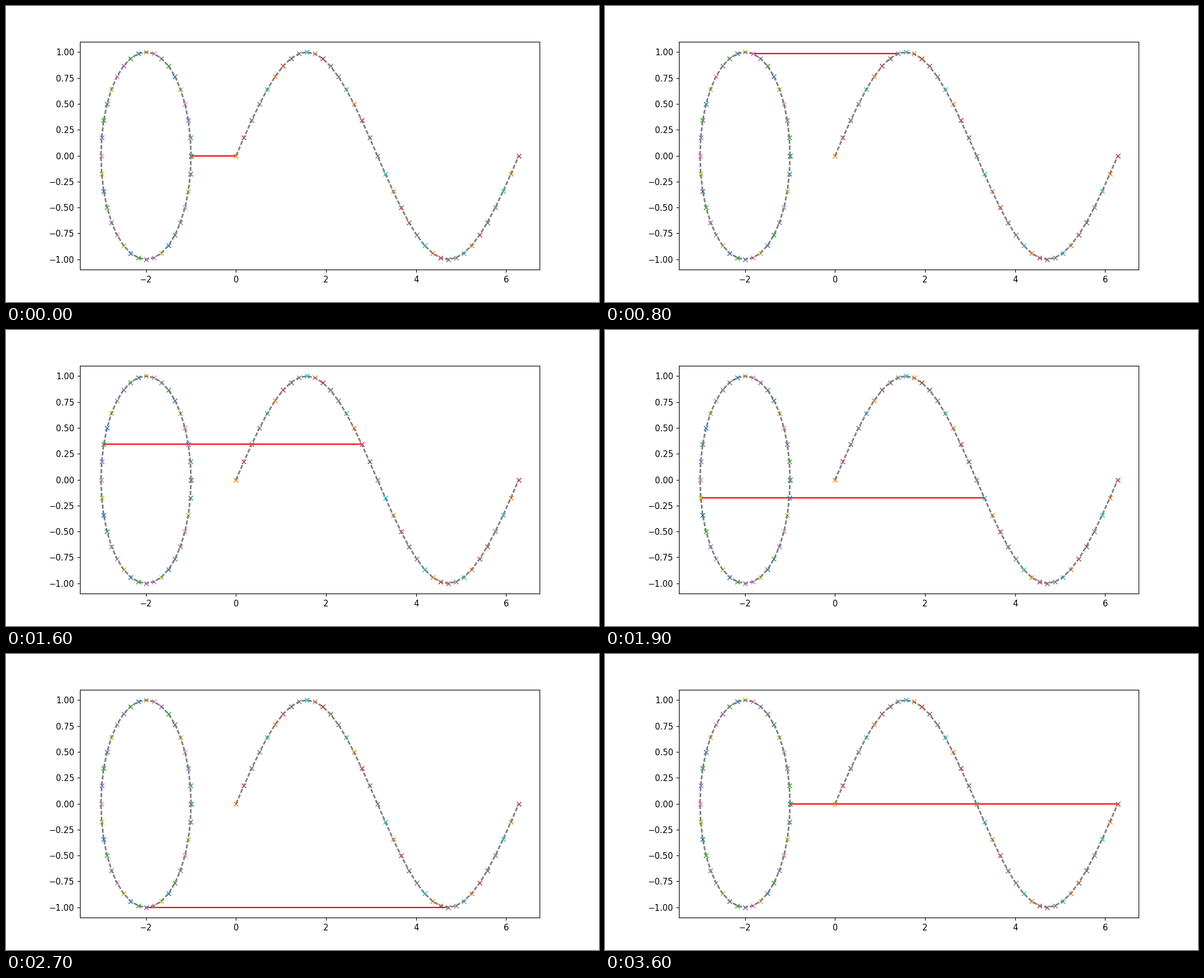
Write a matplotlib script that moves like this. It is 1058 px wide and 529 px high and loops after 3.7 s.

```python
import numpy as np
import matplotlib.pyplot as plt
from matplotlib.animation import FuncAnimation

STEPS = 37
INTERVAL = 100
DASHES = (0, (2.52, 1.09))

theta = np.linspace(0, 2 * np.pi, STEPS)
circle_x = np.cos(theta) - 2
height = np.sin(theta)

fig, ax = plt.subplots(figsize=(10, 5), dpi=105.8)
fig.subplots_adjust(bottom=0.1092, top=0.8792)

# Layers from back to front: connecting line, markers, dashed curves.
link, = ax.plot([circle_x[0], theta[0]], [0, 0], color="red", zorder=1.5)

# Circle and wave points share one colour cycle.
for i in range(STEPS):
    ax.plot(circle_x[i], height[i], "x", color=f"C{2 * i % 10}")
    ax.plot(theta[i], height[i], "x", color=f"C{(2 * i + 1) % 10}")

for x in (circle_x, theta):
    ax.plot(x, height, color="gray", linestyle=DASHES, linewidth=2)

ax.set_xlim(ax.get_xlim())
ax.set_ylim(-1.1, 1.1)


def update(i):
    link.set_data([circle_x[i], theta[i]], [height[i], height[i]])
    return link,


anim = FuncAnimation(fig, update, frames=STEPS, interval=INTERVAL,
                     repeat=True, repeat_delay=0)
plt.show()
```
